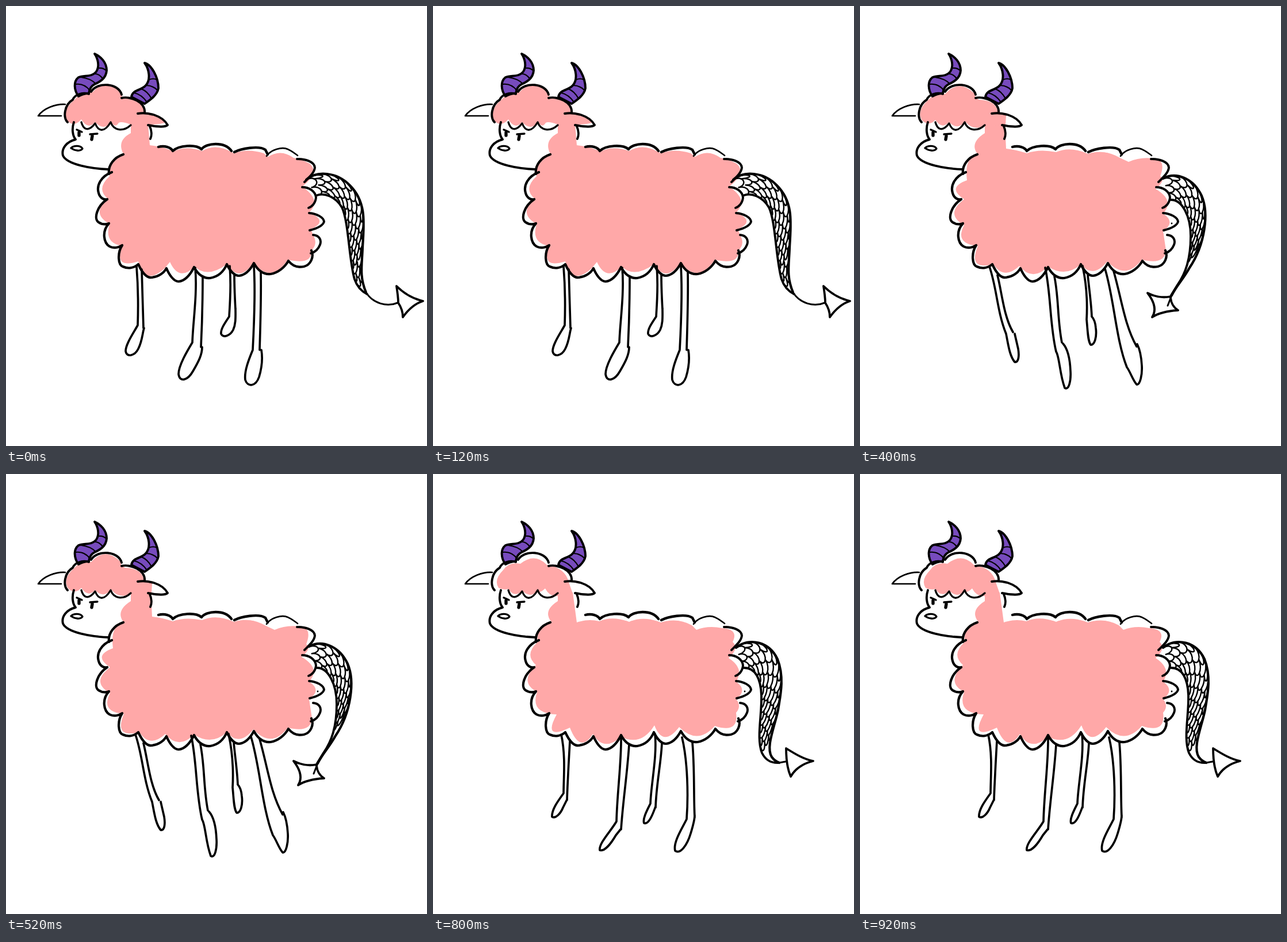
These frames come from a looping animation (732 px wide and 765 px high, 1 s). An HTML page:

```html
<!DOCTYPE html>
<html lang="en">
<head>
<meta charset="utf-8">
<title>Walking woolly beast</title>
<style>
html, body { margin: 0; width: 100%; height: 100%; overflow: hidden; background: #fff; }
svg { display: block; width: 100%; height: 100%; fill: none; stroke: #000; stroke-linecap: round; stroke-linejoin: round; }
.wool { fill: #ffa8a8; stroke: none; }
.horn { fill: #774bbd; }
</style>
</head>
<body>
<svg viewBox="0 0 732 765">
  <g id="poses"></g>
  <g stroke-width="3.9">
    <!-- horns -->
    <path class="horn" d="M154,83C165,88 175,98 175,112C174,126 163,132 154,136C148,139 145,144 144,152Q134,152 126,157C118,146 117,131 126,124C136,120 150,124 157,114C163,105 160,92 154,83Z"/>
    <path class="horn" d="M241,99C253,102 265,124 265,143C263,155 250,164 241,170L218,158C220,145 236,147 243,138C252,128 249,110 241,99Z"/>
    <path stroke-width="2.2" d="M162,108Q168,107 174,112M155,118Q162,118 168,126M131,124Q147,126 156,135M121,136Q136,134 146,147M249,128Q256,125 262,128M244,138Q255,138 264,147M235,144Q246,148 253,161M223,151Q236,154 245,167"/>
    <!-- head -->
    <path d="M107,202C99,194 101,172 116,163C119,155 132,149 144,153M148,149C159,131 196,134 201,154M201,160C216,156 243,167 241,186M229,187C246,184 272,190 281,207C275,212 258,209 247,207M250,209C253,216 254,225 251,231"/>
    <path stroke-width="2.6" d="M103,171C86,170 65,178 56,191L96,191"/>
    <path stroke-width="3.3" d="M131,202C134,213 142,221 155,204C160,217 170,222 182,202C187,216 203,220 217,207"/>
    <path d="M118,202C114,214 116,226 121,232C105,236 96,248 99,260C106,276 150,283 178,284"/>
    <path stroke-width="3.3" d="M123,215L132,219M146,223L159,222M113,247C118,242 130,242 133,248C130,253 120,252 113,247"/>
    <path stroke-width="5.4" d="M127,220L127,225M150,226L149,232"/>
    <!-- fleece -->
    <path stroke-width="4.2" d="M204,258C188,263 177,277 179,292M184,289C165,296 157,312 161,325C163,333 170,338 176,336C158,348 152,370 161,376C167,380 174,380 179,378C166,392 170,412 180,418C187,422 196,420 202,416C193,430 195,450 203,453C212,457 222,456 230,449C236,462 244,473 253,472C264,471 274,465 279,456C284,468 292,479 300,479C311,478 320,468 327,454C334,468 345,474 355,473C367,471 378,463 384,449C390,462 398,469 405,469C416,468 424,460 431,447C438,460 448,467 460,466C473,464 485,454 491,443C498,452 508,455 518,453C530,450 536,436 531,425"/>
    <path d="M534,398C545,399 549,407 546,415C543,423 537,428 530,430M527,360C540,361 552,367 553,375C551,382 540,387 528,390M515,315C527,315 538,322 539,333C538,343 532,349 526,351M506,266C520,266 536,270 537,281C536,290 528,297 519,306"/>
    <path stroke-width="4.4" d="M265,245C276,242 287,246 290,252C300,242 330,240 340,249C348,238 380,235 392,252M397,254C408,248 440,242 451,250L455,258"/>
    <path stroke-width="2.6" d="M453,261C460,250 480,244 490,249C497,252 503,257 507,260"/>
  </g>
</svg>
<script>
const crown = "M108,199Q97,182 119,163Q133,148 148,153Q172,126 199,152Q199,159 207,163Q238,164 240,186L254,190L253,208L217,207Q198,219 183,201Q169,217 155,202Q142,215 131,198Q120,210 108,199Z";

// outer and inner: tail edges that carry scales; tip: thin end; fin: arrowhead
const poses = [{
  crown: "M106,199Q97,180 120,162Q132,146 150,150Q172,126 199,148Q199,158 208,161Q238,160 240,185Q268,187 277,203Q262,207 247,206L217,206Q201,200 196,203Q190,213 183,202Q170,218 155,202Q142,216 131,197Q118,212 106,199Z",
  body: "M217,206L217,221Q192,234 204,257Q179,266 180,296Q156,318 177,335Q147,360 180,379Q170,412 202,417Q187,458 230,444Q240,488 276,456L285,445Q301,480 328,453Q350,474 384,449Q405,482 430,447Q462,484 490,441Q533,451 531,425Q543,414 534,398L530,388Q562,374 527,359Q550,338 515,314Q546,290 528,274Q514,266 500,264Q478,248 456,262L448,256Q420,247 396,256Q366,237 341,252Q312,242 291,253Q275,245 250,242L247,205Z",
  outer: "M522,302C540,286 575,288 598,312C628,342 622,380 620,420C619,450 614,470 626,498",
  inner: "M541,329C553,325 572,330 584,350C596,375 596,440 606,475C610,487 618,496 628,501",
  tip: "M626,498C638,517 662,524 681,516",
  fin: "M679,487C692,500 708,509 725,513C712,517 700,527 690,541C690,530 686,522 682,516C682,505 680,495 679,487Z",
  scaled: .95,
  legs: "M227,453C230,490 230,525 229,555C222,568 208,588 208,600C210,612 224,608 230,596C237,582 237,570 240,560M236,458C237,490 238,530 239,560M329,455C333,500 325,550 324,585C315,600 300,625 300,640C302,655 316,651 325,635C335,618 341,606 341,593M342,470C342,510 341,550 339,593M389,452C392,490 389,520 388,540C380,552 373,562 374,570C378,578 390,573 395,563C400,552 399,540 399,525M397,467C397,490 398,510 399,528M431,452C434,500 431,560 429,598C422,615 414,635 416,650C420,663 434,662 440,645C446,625 446,610 444,598M443,462C444,510 442,560 441,598"
}, {
  body: "M217,206L217,221Q192,236 206,257Q181,264 183,300Q150,325 181,335Q145,362 180,381Q164,414 205,417Q185,460 230,449Q250,482 277,456Q300,484 327,455Q357,474 384,453Q405,480 430,444Q462,480 490,441Q530,453 532,425L527,391Q556,376 527,361Q552,338 514,318Q533,302 522,290Q532,268 515,267Q486,259 461,271L452,262Q425,248 396,257Q366,240 341,254Q312,246 290,255Q272,250 254,247L252,206Z",
  outer: "M527,300C550,286 580,300 592,325C604,360 590,390 580,410C573,425 563,440 559,460",
  inner: "M541,336C556,333 570,348 575,375C579,398 575,420 570,437C567,447 562,452 559,461",
  tip: "M559,460C553,492 574,517 600,516",
  fin: "M608,503C618,518 630,530 645,537C628,540 612,546 600,551C600,540 605,528 602,516Z",
  scaled: .66,
  legs: "M225,455C230,490 230,530 233,562C234,580 237,605 245,616C253,621 257,606 254,592C251,580 245,570 243,562M238,470C239,500 242,535 243,566M327,455C332,500 329,545 333,575C336,600 332,630 336,653C341,660 347,648 349,633C352,610 351,592 345,577M341,470C342,505 343,545 347,577M387,452C392,480 393,515 389,540C386,560 384,580 389,587C396,590 403,580 404,565C405,550 402,540 402,530M397,467C400,490 402,510 403,535M429,455C435,500 437,560 446,627C448,645 448,665 454,674C460,678 463,650 462,630L461,605M442,460C447,510 450,560 464,607"
}, {
  body: "M217,206L217,221Q190,238 204,257Q181,264 186,303Q150,316 181,336Q147,362 181,381Q164,414 205,417Q187,460 232,449Q250,477 277,452Q300,480 327,453Q357,473 384,449Q405,475 430,444Q462,478 490,441Q530,451 532,425L527,391Q550,376 527,361Q548,338 514,318Q533,302 522,296Q532,270 515,266Q490,261 467,271L452,264Q425,248 396,257Q366,243 341,254Q312,248 290,256Q272,250 254,248L252,206Z",
  outer: "M527,300C550,287 580,300 594,330C607,360 600,415 573,455C562,475 551,485 542,503",
  inner: "M541,337C560,337 575,365 575,400C575,440 566,465 552,485L541,503",
  tip: "M542,503L535,521",
  fin: "M500,499C512,505 526,508 540,505C540,515 545,524 553,529C538,530 520,533 508,541C517,527 510,512 500,499Z",
  scaled: .68,
  legs: "M225,453C238,490 238,530 254,570C258,590 260,608 269,619C276,620 277,608 275,596L269,570M239,468C247,500 250,540 266,567M322,455C332,500 330,555 341,601C347,610 347,640 356,664C363,669 367,652 366,635C365,610 360,595 353,587M338,470C346,510 343,545 351,585M387,452C392,475 396,510 394,545C396,565 396,582 401,589C408,590 412,575 410,560C409,548 405,542 403,540M396,467C398,490 402,515 403,540M426,457C442,510 445,580 464,628C470,636 474,650 481,658C487,660 491,640 490,625C489,608 486,596 482,588M441,461C455,510 460,555 481,592"
}, {
  body: "M217,206L217,221Q188,240 206,255Q181,264 186,303Q152,314 182,334Q147,362 183,379Q166,416 210,412Q188,462 238,436Q244,489 277,453Q300,488 318,444Q350,464 384,441Q408,480 427,439Q460,472 490,440Q526,452 524,425Q537,408 527,391Q546,376 527,361Q538,338 514,318Q533,302 520,292Q524,266 505,265Q480,261 457,270Q425,248 396,258Q368,244 347,257Q316,243 297,258Q280,251 260,258L244,206Z",
  outer: "M527,302C550,287 580,300 594,325C610,352 603,385 590,415C575,450 553,482 562,513",
  inner: "M541,337C562,337 570,365 567,395C563,430 546,480 553,505L562,516",
  tip: "",
  fin: "M578,503C584,520 585,540 594,554C580,546 566,542 552,546C560,538 565,526 563,515Q572,511 578,503Z",
  scaled: .74,
  legs: "M224,453C234,490 232,535 234,572C228,585 221,603 224,613C230,619 236,612 239,600L244,573M239,462C239,500 239,535 241,573M326,455C332,500 330,560 332,615C328,630 314,648 317,660C324,668 338,655 343,640C348,625 349,610 349,596M341,470C343,510 338,560 340,611M388,452C392,490 388,530 388,575C382,588 376,605 382,612C389,616 397,606 400,595L402,574M397,467C398,500 399,540 401,577M431,455C443,490 440,550 441,607C436,625 426,645 429,660C436,667 446,655 450,640C456,620 461,610 464,592M452,467C457,510 456,550 467,593"
}, {
  crown: "M114,198Q105,184 122,167Q132,152 152,156Q177,136 198,158Q230,163 236,188L243,208L217,212Q203,214 195,199Q184,209 182,203Q170,217 155,203Q142,216 131,200Q122,202 114,198Z",
  body: "M217,206L217,221Q190,238 206,257Q179,264 182,292Q158,314 179,332Q149,362 181,379Q168,416 215,418Q190,464 238,441Q256,487 278,452Q297,484 327,457Q362,474 385,437Q400,476 428,440Q460,472 490,438Q532,452 527,415Q537,404 527,391Q548,376 527,361Q542,338 514,320Q533,303 521,292Q532,270 503,268Q478,263 458,271L450,263Q425,249 396,258Q366,246 341,257Q312,246 289,256Q270,251 250,258L243,206Z",
  outer: "M527,302C550,283 585,292 599,322C612,355 603,390 600,410C594,440 578,475 589,492Q594,499 602,502",
  inner: "M541,337C560,337 570,355 571,385C572,420 562,460 572,485C579,499 589,503 602,502",
  tip: "M602,502L613,500",
  fin: "M614,477C630,487 645,496 661,499C645,503 630,512 622,526C617,515 614,500 614,477Z",
  scaled: .86,
  legs: "M223,453C231,490 227,530 227,555C218,568 206,583 207,596C213,600 222,590 226,580L233,566M238,465C236,500 234,535 233,567M327,455C328,500 320,555 319,604C310,620 288,642 290,654C299,657 311,640 318,628L326,618M341,470C338,520 330,570 327,618M386,452C390,490 379,540 378,573C372,585 364,600 367,607C375,610 382,592 387,578M398,467C397,500 388,540 387,580M433,458C443,500 444,560 441,600C434,615 417,640 421,655C430,662 442,645 448,625C452,612 455,600 455,593M451,467C455,510 453,560 455,597"
}];

const root = document.getElementById("poses");

function add(parent, tag, attrs) {
  const el = document.createElementNS("http://www.w3.org/2000/svg", tag);
  for (const key in attrs) el.setAttribute(key, attrs[key]);
  return parent.appendChild(el);
}

const line = (parent, d, width) => add(parent, "path", { d, "stroke-width": width });

// Rows of U-shaped arcs between the tail's edges, every other row shifted by half a scale
function scales(outer, inner, end) {
  const at = (path, t) => path.getPointAtLength(Math.min(t, 1) * path.getTotalLength());
  const mix = (t, u) => {
    const a = at(outer, t), b = at(inner, t);
    return [a.x + (b.x - a.x) * u, a.y + (b.y - a.y) * u].map(v => v.toFixed(1)).join();
  };
  const step = 15 / outer.getTotalLength();
  let d = "";
  for (let i = 0; i * step < end - step; i++) {
    const t = i * step, deep = t + step * 1.33;
    const a = at(outer, t), b = at(inner, t);
    const cells = Math.hypot(a.x - b.x, a.y - b.y) > 35 ? 3 : 2;
    for (let c = i % 2 ? -.5 : 0; c < cells; c++) {
      const u = Math.max(0, c / cells), v = Math.min(1, (c + 1) / cells);
      d += `M${mix(t, u)}C${mix(deep, u)} ${mix(deep, v)} ${mix(t, v)}`;
    }
  }
  return d;
}

const groups = poses.map((p, i) => {
  const g = add(root, "g", {});
  add(g, "path", { d: p.body, class: "wool" });
  add(g, "path", { d: p.crown || crown, class: "wool" });
  line(g, p.legs, 3.7);
  const outer = line(g, p.outer, 4.2), inner = line(g, p.inner, 3.9);
  line(g, scales(outer, inner, p.scaled), 2.4);
  line(g, p.tip, 3);
  line(g, p.fin, 3.8);
  if (i > 1) add(g, "circle", { cx: 542, cy: 378, r: 1.4, fill: "#000", stroke: "none" });
  return g;
});

function draw() {
  const now = Math.floor(performance.now() % 1000 / 200);
  groups.forEach((g, i) => g.setAttribute("display", i === now ? "inline" : "none"));
  requestAnimationFrame(draw);
}
draw();
</script>
</body>
</html>
```
